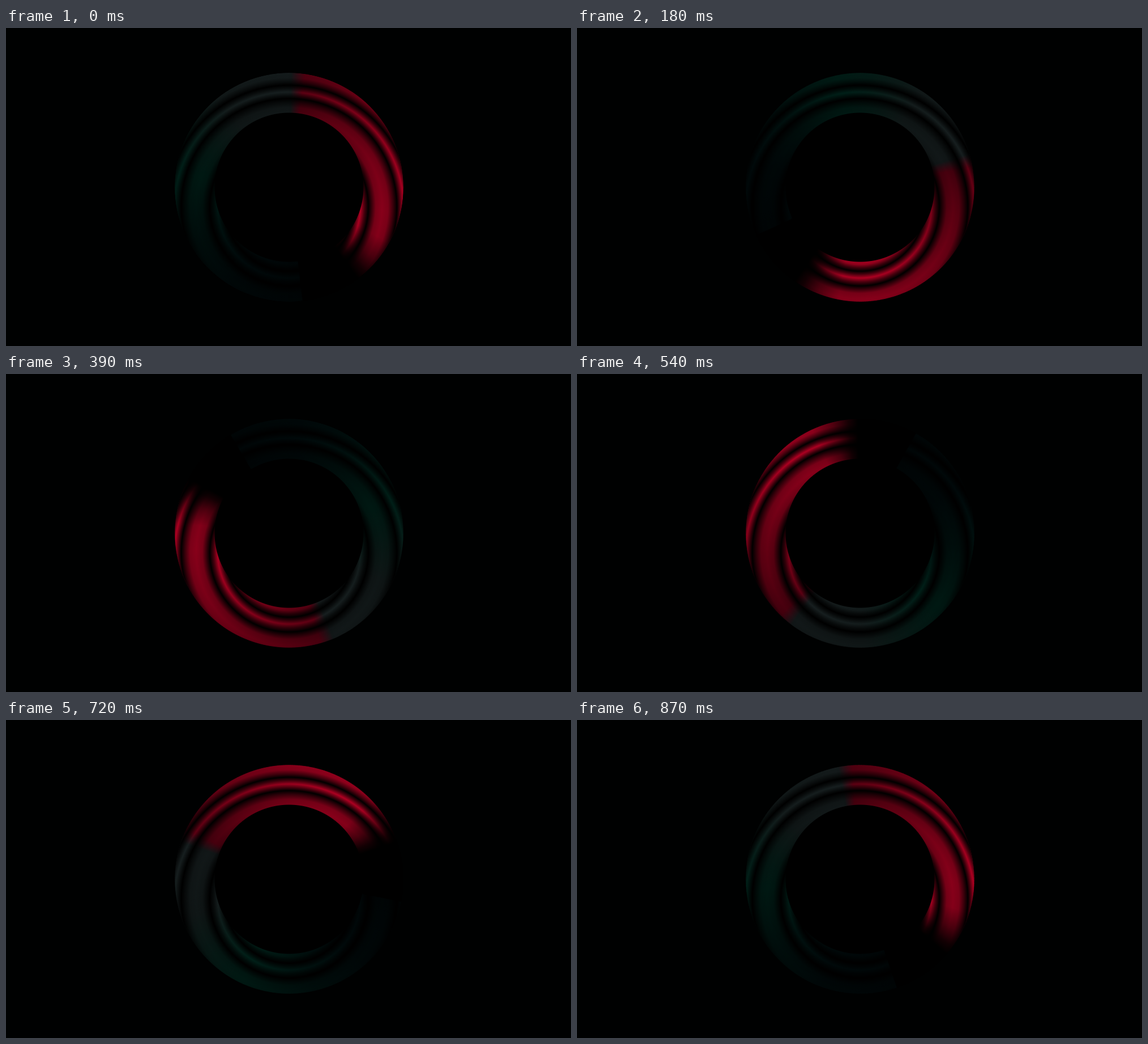
Recreate the animation shown at these times as an HTML page. Size 998 by 561 pixels, loop 0.9 s.

```html
<!DOCTYPE html>
<html lang="en">
<head>
<meta charset="utf-8">
<title>Ring loader</title>
<style>
  html, body {
    margin: 0;
    width: 100%;
    height: 100%;
    overflow: hidden;
    background: #000101;
  }
  .ring {
    position: absolute;
    left: 297.5px;
    top: 79px;
    width: 404px;
    height: 404px;
    border-radius: 50%;
    overflow: hidden;
  }
  .ring > div {
    position: absolute;
    inset: 0;
  }
  /* Sweep of colour, one turn per loop in 30 steps */
  .glow {
    border-radius: 50%;
    background: conic-gradient(
      rgb(24 32 33) 1deg,
      rgb(98 0 20) 8deg,
      rgb(124 0 24) 30deg,
      rgb(164 0 32) 72deg,
      rgb(186 0 36) 104deg,
      rgb(180 0 35) 119deg,
      rgb(104 0 20) 130deg,
      rgb(28 0 5) 138deg,
      #000 143deg 173deg,
      rgb(0 7 8) 173.5deg,
      rgb(0 10 11) 210deg,
      rgb(0 18 16) 240deg,
      rgb(0 34 26) 276deg,
      rgb(6 33 27) 294deg,
      rgb(22 31 31) 322deg,
      rgb(25 33 34) 361deg);
    animation: spin 900ms steps(30) infinite;
  }
  /* Fixed grooves, concentric around a point below the ring's centre */
  .grooves {
    background: radial-gradient(circle at 202px 236px,
      rgb(0 0 0 / .08) 94px,
      rgb(0 0 0 / .2) 102px,
      rgb(0 0 0 / .65) 108px,
      #000 114px,
      rgb(0 0 0 / .65) 119px,
      rgb(0 0 0 / .06) 126px,
      rgb(0 0 0 / .6) 133px,
      #000 140px,
      rgb(0 0 0 / .7) 146px,
      rgb(0 0 0 / .36) 153px,
      rgb(0 0 0 / .27) 164px,
      rgb(0 0 0 / .34) 175px,
      rgb(0 0 0 / .7) 184px,
      #000 190.5px,
      rgb(0 0 0 / .65) 195px,
      rgb(0 0 0 / .06) 202px,
      rgb(0 0 0 / .58) 208px,
      #000 214px,
      rgb(0 0 0 / .62) 220px,
      rgb(0 0 0 / .24) 227px,
      rgb(0 0 0 / .18) 238px);
  }
  .hole {
    background: radial-gradient(circle, #000 131px, transparent 132px);
  }
  @keyframes spin {
    to { transform: rotate(360deg); }
  }
</style>
</head>
<body>
<div class="ring">
  <div class="glow"></div>
  <div class="grooves"></div>
  <div class="hole"></div>
</div>
</body>
</html>
```
